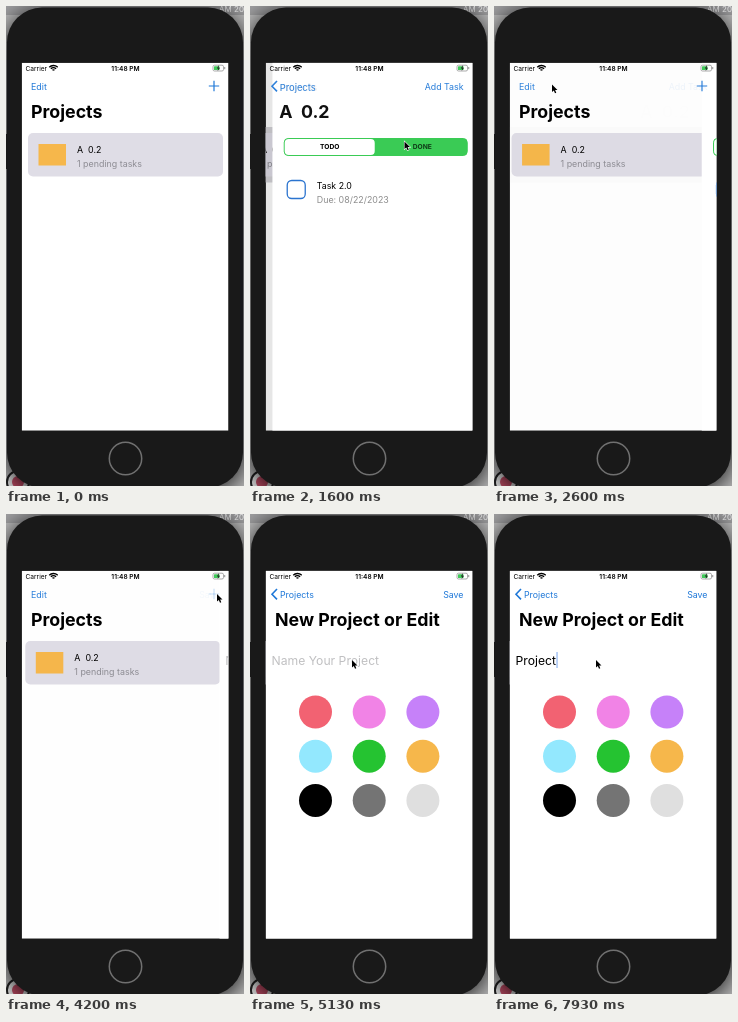
These frames come from a looping animation (238 by 480 pixels, 8000 ms). An HTML page with a canvas:

```html
<!DOCTYPE html>
<html lang="en">
<head>
<meta charset="utf-8">
<title>Projects app</title>
<style>
  html, body { margin: 0; width: 100%; height: 100%; overflow: hidden; background: #191919; }
  canvas { display: block; width: 238px; height: 480px; }
</style>
</head>
<body>
<canvas id="stage"></canvas>
<script>
const LOOP = 8000, W = 238, H = 480;
const SCREEN = { x: 15.7, y: 56.7, w: 206.8, h: 368 };
const BLUE = '#1f78d8', GREEN = '#3acb55', ORANGE = '#f6b74b';
const SWATCHES = ['#f26272', '#f183e6', '#c681f9', '#93e8fe', '#25c331', ORANGE, '#000', '#747474', '#dfdfdf'];
const OPEN_TASKS = 1313, CLOSE_TASKS = 2365, PRESS_PLUS = 4070, OPEN_EDITOR = 4183;
const FOCUS = 5470, BLINK = 6000;
const KEY_TIMES = [6330, 6600, 6670, 7000, 7200, 7330, 7400];

// Pointer stops: time, x, y
const POINTER = [
  [70, 189, 261], [400, 150, 166], [600, 150, 166], [950, 140, 150], [1400, 140, 150],
  [1600, 154.5, 135.5], [1700, 154.5, 135.5], [2250, 58, 78.5], [2600, 58, 78.5], [3070, 211, 82],
  [3270, 211, 82], [3670, 211, 80], [4930, 211, 80], [5110, 102, 146]
];
const ARROW = [[0, 0], [0, 7.6], [1.8, 6], [3, 8.8], [4.3, 8.2], [3.1, 5.6], [5.5, 5.5]];

const canvas = document.getElementById('stage');
const ctx = canvas.getContext('2d');
const dpr = window.devicePixelRatio || 1;
canvas.width = W * dpr;
canvas.height = H * dpr;

const lerp = (a, b, k) => a + (b - a) * k;
const clamp = v => Math.min(1, Math.max(0, v));
const smooth = k => k * k * (3 - 2 * k);

// Critically damped spring, 0 to 1
function spring(ms) {
  const x = Math.max(0, ms) * 0.01826;
  return 1 - (1 + x) * Math.exp(-x);
}

function pushProgress(t) {
  if (t < CLOSE_TASKS) return spring(t - OPEN_TASKS);
  if (t < PRESS_PLUS) return 1 - spring(t - CLOSE_TASKS);
  return spring(t - OPEN_EDITOR);
}

function text(str, x, y, size, color = '#000', weight = 400, align = 'left') {
  ctx.font = `${weight} ${size}px Inter, sans-serif`;
  ctx.textAlign = align;
  ctx.fillStyle = color;
  ctx.fillText(str, x, y);
}

function rect(x, y, w, h, color) {
  ctx.fillStyle = color;
  ctx.fillRect(x, y, w, h);
}

function rounded(x, y, w, h, r, fill, stroke, line = 1) {
  ctx.beginPath();
  ctx.roundRect(x, y, w, h, r);
  paint(fill, stroke, line);
}

function circle(x, y, r, fill, stroke, line) {
  ctx.beginPath();
  ctx.arc(x, y, r, 0, Math.PI * 2);
  paint(fill, stroke, line);
}

function polyline(points, stroke, line, fill) {
  ctx.beginPath();
  points.forEach(([x, y]) => ctx.lineTo(x, y));
  if (fill) ctx.closePath();
  paint(fill, stroke, line);
}

function paint(fill, stroke, line) {
  if (fill) { ctx.fillStyle = fill; ctx.fill(); }
  if (stroke) { ctx.strokeStyle = stroke; ctx.lineWidth = line; ctx.stroke(); }
}

function layer(alpha, dx, draw) {
  if (alpha <= 0) return;
  ctx.save();
  ctx.globalAlpha = alpha;
  ctx.translate(dx, 0);
  draw();
  ctx.restore();
}

function drawPhone() {
  rect(0, 0, W, H, '#c4c4c4');
  rect(0, 0, W, 9, '#a5a5a7');
  text('AM 20', 213, 6, 8, '#fff');
  circle(12, 476, 11, '#eee', '#222', 2);
  circle(12, 476, 6, '#c9506a');
  ctx.save();
  ctx.shadowColor = '#000';
  ctx.shadowBlur = 28 * dpr;
  ctx.shadowOffsetY = 4 * dpr;
  rounded(1, 1.5, 236, 480, 35, '#191919');
  ctx.restore();
  rect(0, 128, 3, 35, '#191919');
  circle(119.5, 452.5, 16.2, null, '#707070', 1.5);
}

function drawStatusBar() {
  text('Carrier', 19.5, 65, 6.6);
  [1.4, 3.6, 5.8].forEach(r => {
    ctx.beginPath();
    ctx.arc(47.5, 65.3, r, -Math.PI * 0.76, -Math.PI * 0.24);
    paint(null, '#000', 1.4);
  });
  text('11:48 PM', 119.5, 65, 6.6, '#000', 600, 'center');
  rounded(207, 59.2, 10.5, 5.8, 1.5, '#fff', '#888', 0.7);
  rounded(208, 60.2, 5.5, 3.8, 0.6, '#41c95a');
  rect(218.3, 61, 0.9, 2.2, '#888');
  polyline([[213, 59], [210.8, 62.4], [212.3, 62.4], [211.5, 65.3], [214, 61.7], [212.5, 61.7]], null, 0, '#222');
}

function drawProjectList(selection) {
  layer(selection, 0, () => rect(16, 121, 207, 55.5, '#d3d2d6'));
  rounded(22, 127, 195, 43.5, 5, '#dfdde6');
  rect(32.5, 138, 27.5, 21.5, ORANGE);
  text('A  0.2', 71, 147, 8.9);
  text('1 pending tasks', 71, 161, 8.9, '#8d8c93');
}

function drawTasks() {
  rounded(27.5, 132.5, 183, 17, 4, GREEN, GREEN);
  rounded(28, 133, 90, 16, 4, '#fff');
  text('TODO', 73, 143.3, 6.7, '#000', 700, 'center');
  text('DONE', 165.5, 143.3, 6.7, '#103c18', 700, 'center');
  rounded(30.5, 174.5, 18, 18, 4.5, '#fff', '#2b74cf', 1.3);
  text('Task 2.0', 60, 183, 8.8);
  text('Due: 08/22/2023', 60, 197, 8.9, '#8d8d8d');
}

function drawEditor(t) {
  const typed = 'Project'.slice(0, KEY_TIMES.filter(k => t >= k).length);
  text(typed || 'Name Your Project', 21.5, 150.5, 12.2, typed ? '#000' : '#c0c0c2');
  const caretX = 22 + (typed ? ctx.measureText(typed).width : 0);
  let caret = t < FOCUS ? 0 : 1;
  if (t >= BLINK && t < KEY_TIMES[0]) caret = 1 - clamp((t - BLINK) / 130);
  if (t >= 7900) caret = 0.6;
  layer(caret, 0, () => rect(caretX, 138, 1.1, 16, '#3478e5'));
  SWATCHES.forEach((color, i) =>
    circle(65.5 + (i % 3) * 53.7, 198 + Math.floor(i / 3) * 44.2, 16.5, color));
}

function drawNavigation(t, p, editing) {
  const title = editing ? 'New Project or Edit' : 'A  0.2';
  const action = editing ? 'Save' : 'Add Task';
  const fade = p * p;
  const x = lerp(25, 30, fade), y = lerp(112, 83.5, fade), size = lerp(17.8, 8.8, fade);
  layer(1 - p, 0, () => text('Edit', 25, 83.5, 8.9, BLUE));
  layer(1 - fade, 0, () => text('Projects', x, y, size, '#000', 700));
  layer((1 - p) * (editing ? 0.25 : 1), 0, () => {
    polyline([[202.8, 80], [213.2, 80]], BLUE, 1.2);
    polyline([[208, 74.8], [208, 85.2]], BLUE, 1.2);
  });
  layer(p, 0, () => text(action, 213.5, 83.5, 8.8, BLUE, 400, 'right'));
  layer(fade, 0, () => {
    text('Projects', x, y, size, BLUE);
    polyline([[27, 75], [22, 80.2], [27, 85.4]], BLUE, 1.6);
  });
  layer(fade, (1 - p) * 130, () => text(title, 25, 112, 17.8, '#000', 700));
}

function drawPointer(t) {
  if (t < POINTER[0][0]) return;
  const next = POINTER.findIndex(stop => stop[0] > t);
  const b = POINTER.at(next), a = next < 0 ? b : POINTER[next - 1];
  const k = next < 0 ? 1 : smooth((t - a[0]) / (b[0] - a[0]));
  ctx.save();
  ctx.translate(lerp(a[1], b[1], k), lerp(a[2], b[2], k));
  polyline(ARROW, '#fff', 1.1, '#fff');
  polyline(ARROW, null, 0, '#000');
  ctx.restore();
}

function draw(t) {
  const p = pushProgress(t);
  const editing = t >= PRESS_PLUS;
  const { x, y, w, h } = SCREEN;
  ctx.setTransform(dpr, 0, 0, dpr, 0, 0);
  drawPhone();

  ctx.save();
  ctx.beginPath();
  ctx.rect(x, y, w, h);
  ctx.clip();
  rect(x, y, w, h, '#fff');
  layer(1, -0.3 * w * p, () => drawProjectList(editing ? 0 : p));
  rect(x, y, w, h, `rgba(0,0,0,${0.1 * p})`);
  layer(p > 0 ? 1 : 0, w * (1 - p), () => {
    rect(x, y, w, h, '#fff');
    if (editing) drawEditor(t); else drawTasks();
  });
  drawNavigation(t, p, editing);
  drawStatusBar();
  ctx.restore();

  drawPointer(t);
}

function tick() {
  draw(performance.now() % LOOP);
  requestAnimationFrame(tick);
}
tick();
</script>
</body>
</html>
```
